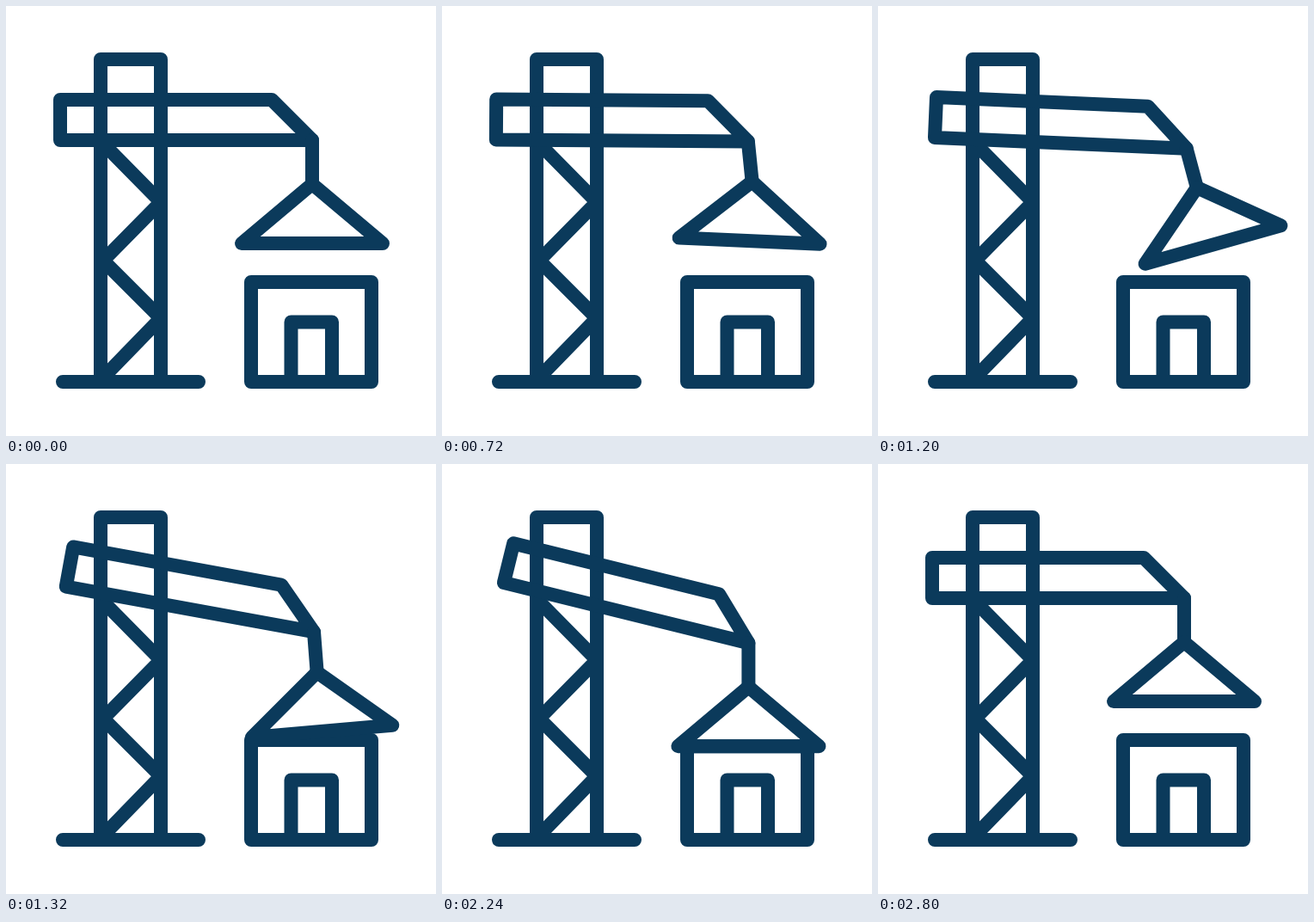
Animation, 500 px wide and 500 px high, one loop 3000 ms. Source, as an HTML page:

```html
<!DOCTYPE html>
<html lang="en">
<head>
<meta charset="utf-8">
<title>Crane</title>
<style>
  html, body { margin: 0; height: 100%; overflow: hidden; background: #fff; }
  svg { display: block; width: 100%; height: 100%; }
  path { fill: none; stroke: #0b3a5b; stroke-width: 16; stroke-linecap: round; stroke-linejoin: round; }
</style>
</head>
<body>
<svg viewBox="0 0 500 500">
  <path d="M66 437H224M110 437V62H180V437M113 160L180 228L113 296L180 363L113 432"/>
  <path id="house"/>
  <path id="arm" d="M63 109H309L356 156H63Z"/>
  <path id="chain"/>
  <path id="roof"/>
</svg>
<script>
const LOOP = 3000, STEP = 40, START = 120, LAND = 1440;
const PIVOT = { x: 141, y: 135 };

// Sine ease from 0 to 1 between times a and b.
function ramp(t, a, b) {
  const k = Math.min(1, Math.max(0, (t - a) / (b - a)));
  return (1 - Math.cos(Math.PI * k)) / 2;
}

// Swing one way until peak, the other way for 600 ms, then settle on landing.
const sway = (t, peak) =>
  ramp(t, START, peak) - 2 * ramp(t, peak, peak + 600) + ramp(t, peak + 600, LAND);

function turn(from, x, y, deg) {
  const a = deg * Math.PI / 180, c = Math.cos(a), s = Math.sin(a);
  return { x: from.x + x * c - y * s, y: from.y + x * s + y * c };
}

const byId = id => document.getElementById(id);
const draw = (id, d) => byId(id).setAttribute("d", d);
const line = (...points) => "M" + points.map(p => `${p.x} ${p.y}`).join("L");

function render(t) {
  const drop = ramp(t, 1050, LAND) - ramp(t, 2200, 2800);
  const tilt = 3 * ramp(t, START, 440) - 6 * ramp(t, 440, 1050)
    + 17 * ramp(t, 1050, LAND) - 14 * ramp(t, 2200, 2800);
  const squash = ramp(t, LAND, 1560) - ramp(t, 1560, 1720);
  const slack = ramp(t, START, 440) - ramp(t, 1320, LAND);

  const hub = { x: PIVOT.x + 11.8 * drop, y: PIVOT.y + 1.3 * drop };
  byId("arm").setAttribute("transform",
    `translate(${hub.x} ${hub.y}) rotate(${tilt}) translate(${-PIVOT.x} ${-PIVOT.y})`);

  // The roof lags a little behind the chain.
  const tip = turn(hub, 356 - PIVOT.x, 156 - PIVOT.y, tilt);
  const apex = turn(tip, 0, 51 - 4 * slack + 4 * squash, 28 * sway(t, 380));
  const half = 82 + 5 * squash, rise = 69 - 5 * squash;
  const corner = x => turn(apex, x, rise, 24 * sway(t, 440));
  draw("chain", line(tip, apex));
  draw("roof", line(apex, corner(-half), corner(half)) + "Z");

  // The roof presses the walls down once it rests on them.
  const top = Math.max(321, apex.y + rise);
  const wall = 2.5 * squash, door = 5 * squash;
  draw("house", `M${285 - wall} 437V${top}H${425 + wall}V437Z` +
    `M${331.5 - door} 437V367.5H${379 + door}V437`);
}

function frame(now) {
  render(Math.floor(now % LOOP / STEP) * STEP);
  requestAnimationFrame(frame);
}
render(0);
requestAnimationFrame(frame);
</script>
</body>
</html>
```
